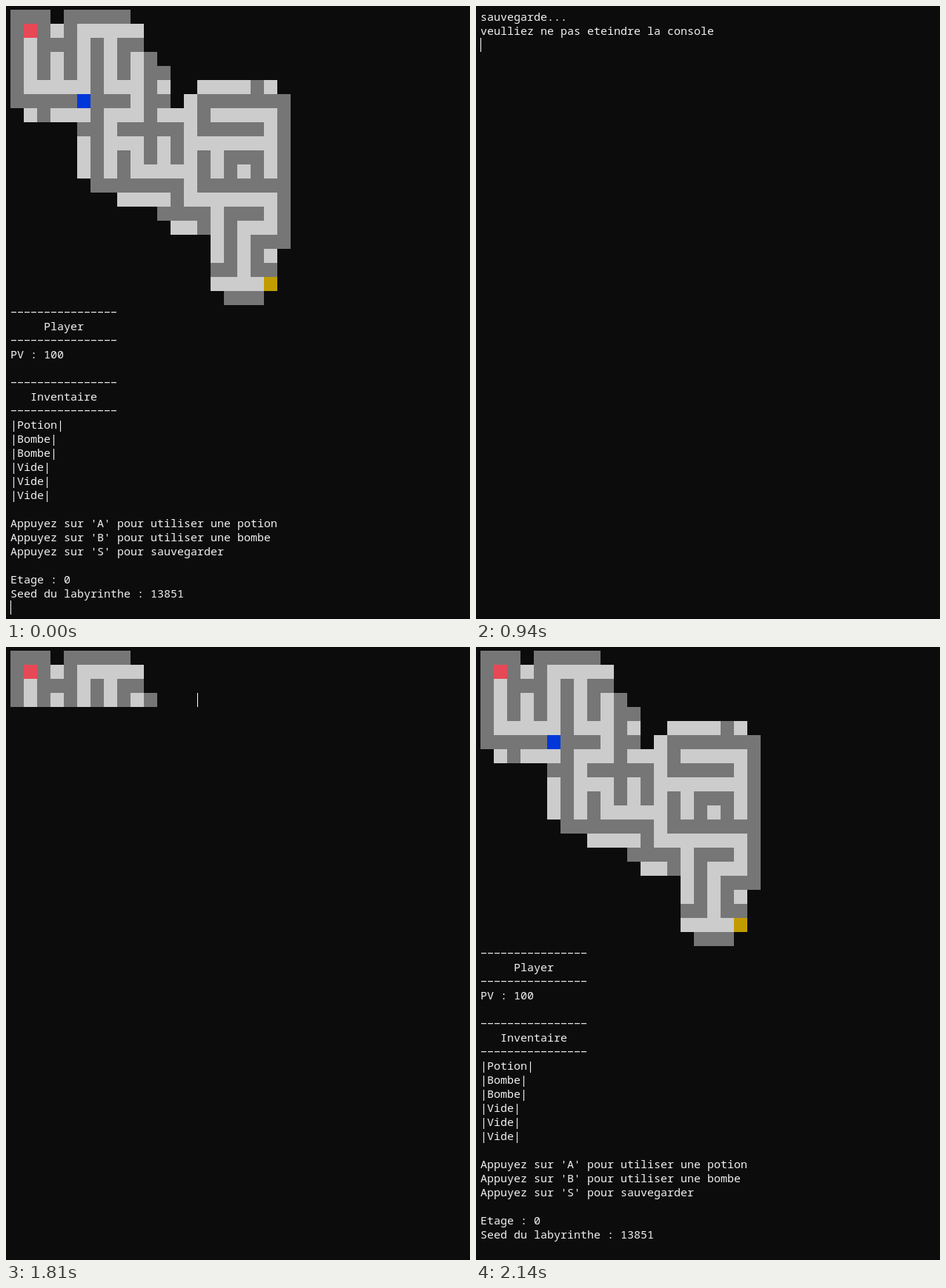
These frames come from a looping animation (626x828 px, 2670 ms). An HTML page with a canvas:

```html
<!DOCTYPE html>
<html lang="fr">
<head>
<meta charset="utf-8">
<title>Labyrinthe</title>
<style>
  html, body { margin: 0; width: 626px; height: 828px; overflow: hidden; background: #0c0c0c; }
  canvas { display: block; }
</style>
</head>
<body>
<canvas id="screen" width="626" height="828"></canvas>
<script>
const ctx = document.getElementById('screen').getContext('2d');
const LEFT = 6, TOP = 5, CHAR_W = 9, LINE_H = 19, LOOP = 2670;

const COLORS = { '#': '#767676', '.': '#cccccc', R: '#e74856', B: '#0037da', Y: '#c19c00' };

const MAZE = [
  '### #####',
  '#R#.#.....',
  '#.###.#.##',
  '#.#.#.#.#.#',
  '#.#.#.#.#.##',
  '#.....#...#.  ....#.',
  '#####B###.## .#######',
  ' .#...#...#...#.....#',
  '     ##.#####.#####.#',
  '     .#...#.#.......#',
  '     .#.#.#.#.#.###.#',
  '     .#.#.....#.#.#.#',
  '      #######.#######',
  '        ....#.......#',
  '           ####.###.#',
  '            ..#.#...#',
  '               .#.###',
  '               .#.#.',
  '               ##.##',
  '               ....Y',
  '                ###',
];

const RULE = '\u2212'.repeat(16);
const STATUS = [
  RULE, '     Player', RULE, 'PV : 100', '',
  RULE, '   Inventaire', RULE,
  '|Potion|', '|Bombe|', '|Bombe|', '|Vide|', '|Vide|', '|Vide|', '',
  "Appuyez sur 'A' pour utiliser une potion",
  "Appuyez sur 'B' pour utiliser une bombe",
  "Appuyez sur 'S' pour sauvegarder", '',
  'Etage : 0',
  'Seed du labyrinthe : 13851',
];
const SAVING = ['sauvegarde...', 'veulliez ne pas eteindre la console'];

function drawMaze(rows) {
  MAZE.slice(0, rows).forEach((line, row) => {
    [...line].forEach((cell, col) => {
      if (cell === ' ') return;
      ctx.fillStyle = COLORS[cell];
      ctx.fillRect(LEFT + col * 2 * CHAR_W, TOP + row * LINE_H, 2 * CHAR_W, LINE_H);
    });
  });
}

function drawText(lines, firstRow) {
  ctx.font = '500 15px "Noto Sans Mono", monospace';
  ctx.fillStyle = '#f2f2f2';
  lines.forEach((line, i) => ctx.fillText(line, LEFT, TOP + (firstRow + i) * LINE_H + 15));
}

function drawCursor(col, row) {
  ctx.fillStyle = '#fff';
  ctx.fillRect(LEFT + col * CHAR_W, TOP + row * LINE_H, 1, LINE_H);
}

function drawGame(cursorOn) {
  drawMaze(MAZE.length);
  drawText(STATUS, MAZE.length);
  if (cursorOn) drawCursor(0, MAZE.length + STATUS.length);
}

function drawSaving(cursorOn) {
  drawText(SAVING, 0);
  if (cursorOn) drawCursor(0, SAVING.length);
}

function drawScreen(t) {
  ctx.fillStyle = '#0c0c0c';
  ctx.fillRect(0, 0, 626, 828);
  if (t < 940) drawGame(t < 470);
  else if (t < 1740) drawSaving(t < 1530);
  else if (t < 1810) drawCursor(0, 0);
  else if (t < 1880) { drawMaze(4); drawCursor(28, 3); }
  else drawGame(t < 2140);
}

const start = performance.now();
function tick() {
  drawScreen((performance.now() - start) % LOOP);
  requestAnimationFrame(tick);
}
tick();
</script>
</body>
</html>
```
